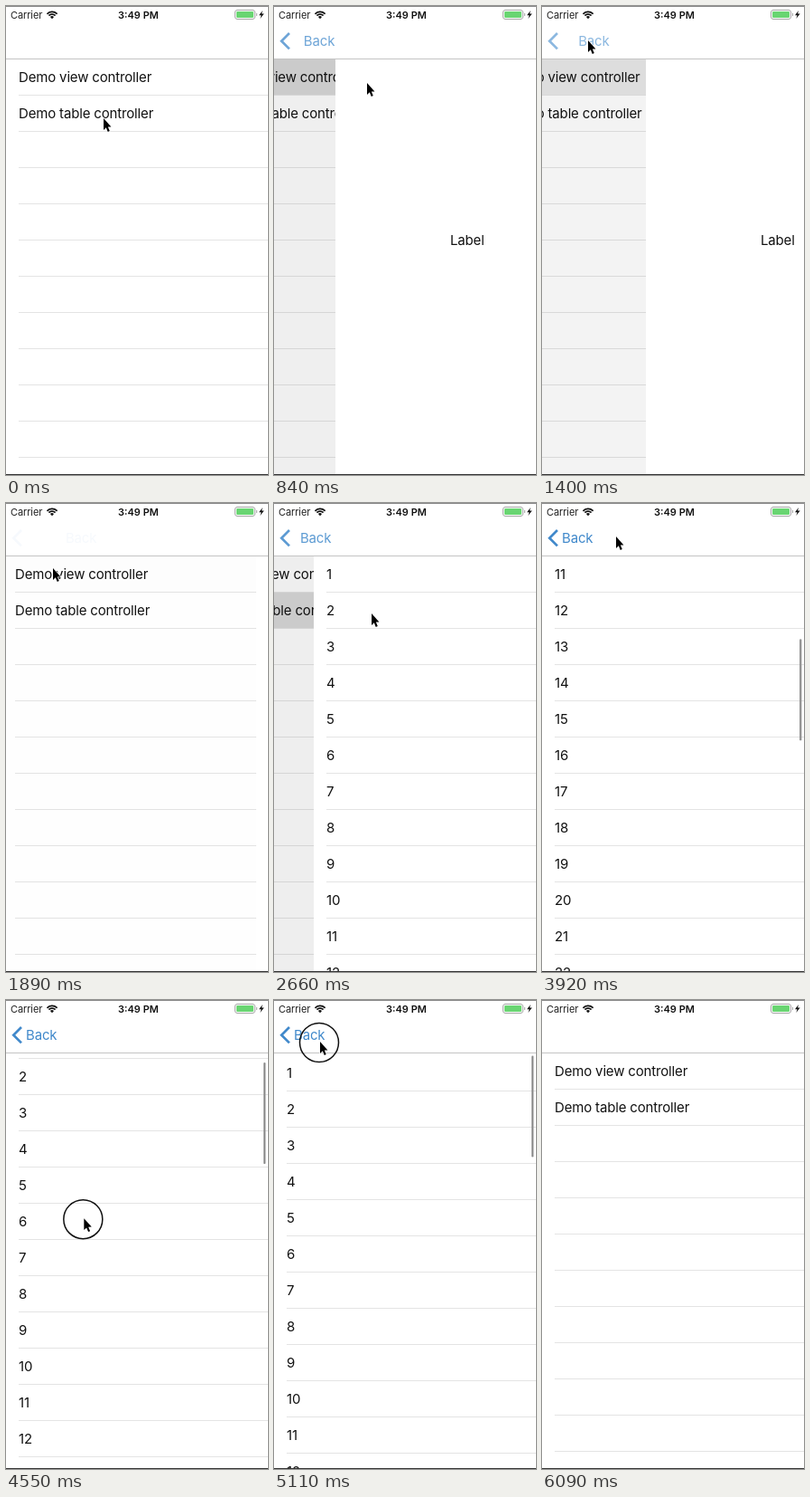
An HTML page with a canvas for the animation above (6.16 s loop, 290 px wide and 518 px high).

```html
<!DOCTYPE html>
<html lang="en">
<head>
<meta charset="utf-8">
<title>Navigation demo</title>
<style>
html, body { margin: 0; height: 100%; overflow: hidden; background: #fff; }
canvas { display: block; }
</style>
</head>
<body>
<canvas id="stage" width="290" height="518"></canvas>
<script>
const W = 290, H = 518, TOP = 58, ROW = 40, LOOP = 6160, STEP = 70;
const LINE = '#e4e4e4', BLUE = '#4189cb';
const SCROLL_UP = 3080, SCROLL_DOWN = 4270, GONE = 6090;
const c = document.getElementById('stage').getContext('2d');

// Pointer moves between rests; drags show the touch ring
const moves = [
  { from: 0, to: 280, x: 42, y: 77 },
  { from: 560, to: 840, x: 103, y: 85 },
  { from: 840, to: 1190, x: 51, y: 38 },
  { from: 1400, to: 1890, x: 52, y: 72 },
  { from: 1890, to: 2240, x: 108, y: 122 },
  { from: SCROLL_UP, to: 3500, x: 88, y: 3, drag: true },
  { from: 3570, to: 3920, x: 82, y: 37 },
  { from: 3920, to: 4130, x: 82, y: 90 },
  { from: SCROLL_DOWN, to: 4700, x: 88, y: 300, drag: true },
  { from: 4700, to: 5040, x: 51, y: 46 },
  { from: 5180, to: 5810, x: 93, y: 515 }
];

// Each visit to a detail page: push and pop times with spring rates
const visits = [
  { row: 0, push: 545, pushRate: 9.4, pop: 1208, popRate: 7.1 },
  { row: 1, push: 2290, pushRate: 9.1, pop: 5145, popRate: 13.3 }
];

// Part of the way still to go for a critically damped spring
function spring(ms, rate) {
  const x = Math.max(0, ms) / 1000 * rate, rest = (1 + x) * Math.exp(-x);
  return rest < 0.002 ? 0 : rest;
}

function pointerAt(t) {
  let x = 108, y = 124;
  for (const m of moves) {
    if (t <= m.from) break;
    const f = Math.min(1, (t - m.from) / (m.to - m.from)), e = f * f * (3 - 2 * f);
    x += (m.x - x) * e;
    y += (m.y - y) * e;
  }
  return [x, y];
}

function isPressed(t) {
  const near = e => t > e - 50 && t < e + 20;
  return visits.some(v => near(v.push) || near(v.pop)) ||
    moves.some(m => m.drag && t >= m.from && t < m.to);
}

// Flick up, then flick back with a slight bounce past the top
function scrollAt(t) {
  if (t < SCROLL_DOWN) return 401 * (1 - spring(t - SCROLL_UP, 10));
  const s = (t - SCROLL_DOWN) / 1000;
  return 401 * Math.exp(-6.3 * s) * Math.cos(3.75 * s);
}

function rect(x, y, w, h, color) {
  c.fillStyle = color;
  c.fillRect(x, y, w, h);
}

function pill(x, y, w, h, r) {
  c.beginPath();
  c.roundRect(x, y, w, h, r);
}

function path(points, close) {
  c.beginPath();
  points.forEach(p => c.lineTo(...p));
  if (close) c.closePath();
}

function text(s, x, y, color = '#111', font = '15px', gap = -0.16) {
  c.font = font + ' Inter, Roboto, sans-serif';
  c.letterSpacing = gap + 'px';
  c.fillStyle = color;
  c.fillText(s, x, y);
}

function drawMenu(p, row, highlight) {
  const x = -87 * p;
  rect(0, TOP, W, H - TOP, '#fff');
  c.globalAlpha = highlight;
  rect(0, TOP + 1 + row * ROW, W, ROW, '#d9d9d9');
  c.globalAlpha = 1;
  for (let y = TOP + ROW; y < H; y += ROW) rect(x + 14, y, W, 1, LINE);
  ['view', 'table'].forEach((s, i) => text(`Demo ${s} controller`, x + 14, 84 + i * ROW));
  rect(0, TOP, W, H - TOP, `rgba(0,0,0,${0.08 * p})`);
}

function drawDetail(x, row, t) {
  x = Math.round(x);
  rect(x, TOP, W, H - TOP, '#fff');
  if (row === 0) {
    text('Label', x + 127, 264);
    return;
  }
  const offset = scrollAt(t);
  for (let n = 1; n <= 50; n++) {
    const y = Math.round(TOP + (n - 1) * ROW - offset);
    text(String(n), x + 14, y + 26);
    rect(x + 14, y + ROW, W, 1, LINE);
  }
  if (t >= SCROLL_UP) {
    c.fillStyle = '#959595';
    pill(x + 285, 61.5 + Math.max(0, offset) * 0.222, 2.4, 112, 1.2);
    c.fill();
  }
}

function drawStatus() {
  text('Carrier', 5, 14, '#222', '11px', -0.1);
  text('3:49 PM', 124, 14, '#111', '600 11px', 0);

  // Wireless fan
  c.strokeStyle = c.fillStyle = '#111';
  c.lineWidth = 1.7;
  const fan = r => c.arc(51, 14, r, -Math.PI * 0.76, -Math.PI * 0.24);
  for (const r of [7.6, 4.9]) {
    c.beginPath();
    fan(r);
    c.stroke();
  }
  c.beginPath();
  c.moveTo(51, 14.2);
  fan(2.8);
  c.fill();

  // Battery and charging bolt
  c.strokeStyle = '#a5a5a5';
  c.lineWidth = 1;
  pill(253.5, 4.5, 22, 10, 2.5);
  c.stroke();
  c.fillStyle = '#69d572';
  pill(255, 6, 19, 7, 1.2);
  c.fill();
  rect(277, 8, 1, 3, '#a5a5a5');
  c.fillStyle = '#111';
  path([[284, 5], [280, 10.2], [282.5, 10.2], [281.3, 14], [285.6, 8.6], [283, 8.6]], true);
  c.fill();
}

function drawBars(p) {
  rect(0, 0, W, TOP, '#fff');
  rect(0, TOP, W, 1, '#c4c4c4');
  drawStatus();
  c.globalAlpha = p;
  c.strokeStyle = BLUE;
  c.lineWidth = 2.7;
  path([[17, 30], [8.3, 38.7], [17, 47.4]]);
  c.stroke();
  text('Back', 22 + 46 * (1 - p), 44, BLUE);
  c.globalAlpha = 1;
}

function drawPointer(x, y, pressed) {
  if (pressed) {
    c.strokeStyle = '#111';
    c.lineWidth = 1.5;
    c.beginPath();
    c.arc(x - 1, y + 1, 21.5, 0, 7);
    c.stroke();
  }
  c.save();
  c.translate(x, y);
  c.scale(0.88, 0.92);
  path([[0, 0], [0, 14], [3.2, 11.2], [5.4, 16.2], [7.7, 15.2], [5.5, 10.4], [9.6, 10.2]], true);
  c.strokeStyle = '#fff';
  c.lineWidth = 1.6;
  c.stroke();
  c.fillStyle = '#000';
  c.fill();
  c.restore();
}

function draw(t) {
  const v = visits[+(t >= visits[1].push)];
  const popping = t >= v.pop;
  const p = popping ? spring(t - v.pop, v.popRate) : 1 - spring(t - v.push, v.pushRate);
  drawMenu(p, v.row, popping ? p : +(t >= v.push));
  if (p > 0) drawDetail(W * (1 - p), v.row, t);
  drawBars(p);
  rect(0, 0, W, 1, '#888');
  rect(0, H - 1, W, 1, '#333');
  if (t < GONE) drawPointer(...pointerAt(t), isPressed(t));
}

const start = performance.now();
function frame() {
  const t = (performance.now() - start) % LOOP;
  draw(Math.floor(t / STEP) * STEP);
  requestAnimationFrame(frame);
}
frame();
</script>
</body>
</html>
```
